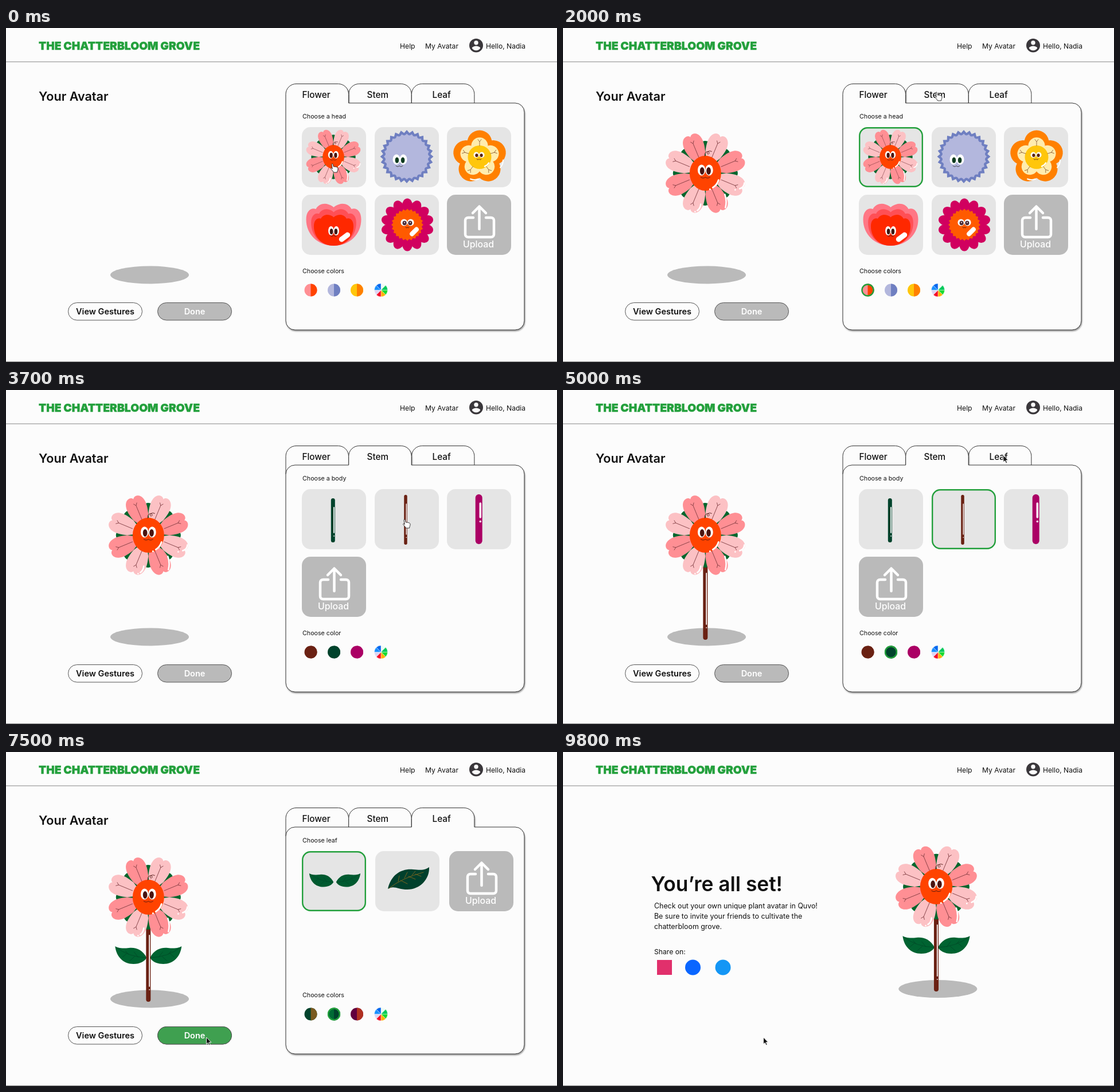
Recreate the animation shown at these times as an HTML page. Size 961 by 583 pixels, loop 9900 ms.

```html
<!DOCTYPE html>
<html lang="en">
<head>
<meta charset="utf-8">
<title>Plant avatar builder</title>
<style>
  html, body { margin: 0; width: 100%; height: 100%; overflow: hidden; background: #fcfcfc; }
  svg { display: block; }
  text { font-family: Inter, "Open Sans", sans-serif; fill: #111; }
  .line { fill: none; stroke-linecap: round; stroke-linejoin: round; }
  .panel { fill: #fcfcfc; stroke: #333; filter: drop-shadow(1.5px 2px 1px #0006); }
</style>
</head>
<body>
<svg id="stage" width="961" height="583" viewBox="0 0 961 583"></svg>
<script>
const GREEN = '#23a03c', GREY = '#bababa', BROWN = '#6a2113', FOREST = '#00432c', LEAF = '#006331';
const stage = document.getElementById('stage');

// Drawing helpers
const text = (x, y, size, weight, value, extra = '') =>
  `<text x="${x}" y="${y}" font-size="${size}" font-weight="${weight}" ${extra}>${value}</text>`;
const oval = (x, y, rx, ry, fill) => `<ellipse cx="${x}" cy="${y}" rx="${rx}" ry="${ry}" fill="${fill}"/>`;
const disc = (x, y, r, fill) => oval(x, y, r, r, fill);
const shape = (d, fill) => `<path d="${d}" fill="${fill}"/>`;
const line = (d, color, width) => `<path class="line" d="${d}" stroke="${color}" stroke-width="${width}"/>`;
const box = (x, y, w, h, r, fill, extra = '') =>
  `<rect x="${x}" y="${y}" width="${w}" height="${h}" rx="${r}" fill="${fill}" ${extra}/>`;
const at = (x, y, body, more = '') => `<g transform="translate(${x} ${y}) ${more}">${body}</g>`;
const spin = (n, item, offset = 0) => Array.from({ length: n }, (_, i) =>
  `<g transform="rotate(${offset + i * 360 / n})">${item(i)}</g>`).join('');
const fade = (name, body) => `<g style="opacity:var(--${name})">${body}</g>`;

const eyes = (x, y, gap, rx, ry, pupil, prx, pry) => [-1, 1].map(side =>
  oval(x + side * gap, y, rx, ry, '#fff') + oval(x + side * gap * .85, y + ry * .15, prx, pry, pupil)).join('');
const mouth = (x, y, w, color) =>
  line(`M${x - w} ${y - 1}q${w / 2} 3 ${w} 0q${w / 2} 3 ${w} 0`, color, .9);
const shine = (x, y, length, width, angle) =>
  at(x, y, box(-length / 2, -width / 2, length, width, width / 2, '#fff'), `rotate(${angle})`);

function star(points, outer, inner) {
  const corners = Array.from({ length: points * 2 }, (_, i) => {
    const a = i * Math.PI / points, r = i % 2 ? inner : outer;
    return `${(r * Math.sin(a)).toFixed(1)} ${(-r * Math.cos(a)).toFixed(1)}`;
  });
  return `M${corners.join('L')}Z`;
}

// Flower heads, each centred on 0,0
function daisy() {
  const petal = 'M0-10L-14-34C-17-44-19-53-17-61C-14-73-3-74 0-68C3-74 14-73 17-61C19-53 17-44 14-34Z';
  return spin(8, () => oval(0, -40, 13, 16.5, '#00662d')) +
    spin(8, i => shape(petal, i % 2 ? '#ff8f94' : '#fcc1c4') +
      line('M0-30V-56M-3-60L0-56L3-60', '#7d3a3f', .8), 22.5) +
    oval(0, 0, 27.5, 30.5, '#ff4300') +
    line('M-1-30C-2-36 2-39 6-37C9-34 3-32 3-35C3-38 7-40 11-38', '#4a1410', .9) +
    eyes(0, -5.5, 6.7, 6.7, 9.5, '#4a1410', 3.8, 6.5) + mouth(0, 8, 8, '#4a1410') +
    line('M23 12Q20 21 13 25M8 28h.1', '#fff', 3) +
    line('M68 17Q68 24 60 27M52 29h.1M34 37Q38 48 35 60M-8 54Q-9 62-14 65M-18 67h.1', '#fff', 2.6);
}
const puff = () =>
  shape(star(28, 46.5, 41.5), '#6f7fc1') + shape(star(28, 40, 36.5), '#b3b7dd') + disc(0, 0, 37.5, '#b3b7dd') +
  eyes(-12, 5, 6, 6.5, 9, '#0d3b20', 3.3, 5) + mouth(-13, 17, 6, '#333');
const blossom = () =>
  spin(5, () => disc(0, -25.5, 21.5, '#ff8000')) + spin(5, () => disc(0, -20, 14.5, '#ffecae')) +
  disc(0, 0, 20.5, '#ffc60b') + spin(5, () => line('M0-20V-27M-3-31L0-27L3-31', '#8a5a30', .8)) +
  eyes(-1, -4, 4.8, 4.7, 5, '#5b2410', 2.6, 3) + mouth(-1, 4, 4, '#5b2410') +
  line('M-16 38Q-9 41-2 38M41 5Q41 13 36 18', '#fff', 2) + line('M9 16Q14 14 16 10', '#fff', 2.5);
function tulip() {
  const half = shape('M0 0C-28 0-48-20-48-46C-48-60-40-67-31-64C-27-72-17-75-9-72C-5-71-2-69 0-67L1-67V0Z', 'currentColor');
  const layer = (sx, sy, color) => `<g color="${color}">` +
    [-1, 1].map(side => at(0, 37, half, `scale(${side * sx} ${sy})`)).join('') + '</g>';
  return layer(1, 1, '#ff7785') + layer(.82, .87, '#ff4f55') + layer(.72, .74, '#ff2800') +
    eyes(0, 11, 4.6, 4.8, 8, '#3d1712', 2.8, 5) + mouth(0, 20, 6, '#3d1712') + shine(19, 22, 22, 9, -37);
}
const dahlia = () =>
  spin(14, () => oval(0, -34, 9, 12, '#d1005f')) + disc(0, 0, 34, '#d1005f') +
  shape(star(24, 28, 25), '#ff5a00') +
  eyes(0, -4, 5.8, 5.8, 6, '#4b2a35', 3.5, 3.8) + disc(-5, -4, 1, '#fff') + disc(5, -4, 1, '#fff') +
  mouth(0, 5, 3, '#4b1a10') + shine(12, 12, 19, 8, -45);

// Stems and leaves
const stem = (x, y, w, h, color, shineX, top, bottom, shineW) =>
  box(x - w / 2, y, w, h, w / 2, color) +
  line(`M${shineX} ${top}V${bottom}M${shineX} ${bottom + 4 + shineW}h.1`, '#fff', shineW);
function leafPair(color) {
  const leaf = shape('M3 106C10 92 22 87.5 34 89S54 89 58 86C56 104 44 117 26 117C14 117 6 112 3 106Z', color) +
    line('M4 106Q34 105 56 88M18 105L25 96M24 104L33 112M35 100L40 94M38 99L45 105', '#004526', .7);
  return leaf + `<g transform="scale(-1 1)">${leaf}</g>`;
}
const bigLeaf = () =>
  shape('M666 239C672 212 692 203 710 205S732 205 738 201C739 222 722 240 700 240C684 240 676 232 666 239Z', '#00402c') +
  line('M668 238Q690 220 728 210M684 226L686 216M695 220L700 210M708 215L714 208M688 224L700 230M702 217L714 222M714 213L724 217', '#7a6420', 1);

// Interface parts
const tile = (x, y, body = '') => box(x, y, 112, 105, 15, '#e5e5e5') + body;
const pickedTile = (x, y) => box(x + 1.2, y + 1.2, 109.6, 102.6, 14, 'none', `stroke="${GREEN}" stroke-width="2.4"`);
const upload = (x, y) => at(x, y, box(0, 0, 112, 105, 15, GREY) +
  line('M46 40H37a5 5 0 0 0-5 5V69a5 5 0 0 0 5 5H77a5 5 0 0 0 5-5V45a5 5 0 0 0-5-5H68M56.5 60V21M45 32L56.5 20.5L68 32', '#fff', 4.5) +
  text(55, 92, 15.9, 500, 'Upload', 'text-anchor="middle" style="fill:#fff"'));
const pickedSwatch = x => `<circle cx="${x}" cy="457.5" r="10" fill="none" stroke="${GREEN}" stroke-width="2.4"/>`;

function swatches(pairs) {
  const xs = [531.5, 572, 612];
  const wheel = ['#eefaf4', '#00c95a', '#18dc30', '#ffb000', '#f5102a', '#dfd5f2', '#1890ff', '#0868ee'];
  return pairs.map(([left, right], i) =>
    at(xs[i], 457.5, disc(0, 0, 11, left) + shape('M0-11a11 11 0 0 1 0 22z', right || left))).join('') +
    at(654, 457.5, spin(8, i => `<path d="M0 0V-11.5A11.5 11.5 0 0 1 8.13-8.13Z" fill="${wheel[i]}" stroke="#fff" stroke-width=".4"/>`));
}

function panel(active, heading, colors, body) {
  const tabTop = 'V115.5a18 18 0 0 1 18-18h73.5a18 18 0 0 1 18 18';
  const left = i => 488 + i * 109.7;
  const tabs = [0, 1, 2].filter(i => i !== active)
    .map(i => `<path d="M${left(i)} 147${tabTop}V147" fill="#fcfcfc" stroke="#333"/>`).join('');
  const corner = active ? `a16 16 0 0 1 16-16H${left(active)}` : '';
  return `<g id="panel${active}">${tabs}
    <path class="panel" d="M488 147${corner}${tabTop}V131H888a16 16 0 0 1 16 16V511a16 16 0 0 1-16 16H504a16 16 0 0 1-16-16Z"/>
    ${['Flower', 'Stem', 'Leaf'].map((name, i) => text([516.5, 629.5, 743.5][i], 122, 15.3, 500, name)).join('')}
    ${text(517, 158, 10.7, 400, heading)}
    ${text(517, 427.5, 10.7, 400, active === 1 ? 'Choose color' : 'Choose colors')}
    ${swatches(colors)}${body}</g>`;
}

const button = (x, fill, label, color) => box(x, 479.5, 129, 30.5, 15.2, fill, 'stroke="#555"') +
  text(x + 64.5, 500, 14.5, 600, label, `text-anchor="middle" style="fill:${color}"`);

const bloom = (x, y, scale) => at(x, y, '<use href="#daisy"/>', `scale(${scale})`);
const plantStem = stem(0, 45, 8, 138, BROWN, 1.8, 67, 156, 1.8);

const header =
  text(57, 38, 19.3, 900, 'THE CHATTERBLOOM GROVE', `style="fill:${GREEN}" stroke="${GREEN}" stroke-width=".4"`) +
  text(687, 36, 12.2, 400, 'Help') + text(731, 36, 12.2, 400, 'My Avatar') + text(837, 36, 12.1, 400, 'Hello, Nadia') +
  at(820, 30.5, disc(0, 0, 12, '#3a373b') + disc(0, -4.8, 3.7, '#fcfcfc') +
    shape('M-7.2 4.8C-7.2 2.4-2.4 1.1 0 1.1S7.2 2.4 7.2 4.8C4 10-4 10-7.2 4.8Z', '#fcfcfc')) +
  line('M0 59H961M0 582.5H961', '#858585', 1);

const builder =
  text(57, 127, 21.6, 600, 'Your Avatar') + oval(250.5, 431, 68.5, 15.5, GREY) +
  at(248.3, 253, fade('leaf', leafPair(LEAF)) + fade('stem', plantStem)) +
  fade('flower', bloom(248.3, 253.5, 1)) +
  button(108.5, '#fcfcfc', 'View Gestures', '#111') + button(264.5, GREY, 'Done', '#fff') +
  fade('leaf', button(264.5, '#3fa050', 'Done', '#fff')) +
  panel(0, 'Choose a head', [['#ff8f94', '#ff4300'], ['#b3b7dd', '#6f7fc1'], ['#ffc60b', '#ff8000']],
    tile(516, 173, bloom(571, 225, .685)) + tile(643, 173, at(699, 224.5, puff())) +
    tile(769, 173, at(826, 225.5, blossom())) + tile(516, 291, at(571.5, 343, tulip())) +
    tile(643, 291, at(700, 343.5, dahlia())) + upload(769, 291) +
    fade('flower', pickedTile(516, 173) + pickedSwatch(531.5))) +
  panel(1, 'Choose a body', [[BROWN], [FOREST], ['#ab0065']],
    tile(516, 173, stem(570.3, 189, 7, 77, FOREST, 572, 205, 249, 1.8)) +
    tile(643, 173, stem(697, 183, 5.5, 87, BROWN, 698.2, 199, 252, 1.4)) +
    tile(769, 173, stem(824.7, 182, 12, 87, '#ab0065', 827.3, 198, 222, 3.5)) + upload(516, 291) +
    fade('stem', pickedTile(643, 173) + pickedSwatch(572))) +
  panel(2, 'Choose leaf', [[FOREST, '#7a5a20'], ['#006a35', FOREST], ['#62003f', '#b03020']],
    tile(516, 173, at(573.5, 145.5, leafPair('#005a30'), 'scale(.77)')) +
    tile(644, 173, bigLeaf()) + upload(773, 173) +
    fade('leaf', pickedTile(516, 173) + pickedSwatch(572)));

const finish =
  box(0, 60, 961, 522, 0, '#fcfcfc') + text(153.5, 243, 35.3, 600, 'You’re all set!') +
  ['Check out your own unique plant avatar in Quvo!', 'Be sure to invite your friends to cultivate the', 'chatterbloom grove.']
    .map((row, i) => text(159, 272.5 + i * 18.4, 12.4, 400, row)).join('') +
  text(159, 353, 12.2, 400, 'Share on:') +
  box(164, 363, 26, 26, 0, '#e1306c') + disc(226.5, 376, 13.5, '#0a66ff') + disc(279, 376, 13.5, '#1496f5') +
  oval(653.8, 413.5, 68.5, 15.5, GREY) +
  at(651, 235, leafPair(LEAF) + plantStem + bloom(0, 0, 1.015), 'scale(1.01 1)');

const hand = 'M0 1.2C0-.5 2-.5 2.3 1.2L3.2 5C8 5 11 6 11 8.5C11 11 10 12 9.5 15H3.5C2 12-1 9.5-1.5 8.5C-1.5 7 0 7 1.2 8.8Z';
const arrow = 'M0 0V12L2.8 9.4L4.7 13.8L6.7 13L4.8 8.7H8.5Z';

stage.innerHTML = `<defs><g id="daisy">${daisy()}</g></defs>${header}${builder}${fade('finish', finish)}
  <path id="cursor" stroke-width=".9"/>`;

// Timeline, in milliseconds
const LOOP = 9900, STEP = 100;
const fades = { flower: [400, 700], stem: [3800, 4100], leaf: [6300, 6700], finish: [7600, 7900] };
const tabStarts = [0, 2200, 5100, LOOP];
const stops = [
  [0, 568, 237], [1100, 568, 237], [1900, 650, 112], [2500, 650, 112], [3400, 694, 226], [4200, 694, 226],
  [4900, 768, 114], [5200, 768, 114], [6100, 598, 225], [6700, 598, 225], [7400, 349.5, 498], [LOOP, 349.5, 498]
];
const cursor = document.getElementById('cursor');
const panels = [0, 1, 2].map(i => document.getElementById('panel' + i));
const progress = (t, from, to) => Math.min(1, Math.max(0, (t - from) / (to - from)));

function render(now) {
  const t = Math.floor(now % LOOP / STEP) * STEP;
  for (const [name, [from, to]] of Object.entries(fades)) stage.style.setProperty('--' + name, progress(t, from, to));
  panels.forEach((p, i) => p.style.display = t >= tabStarts[i] && t < tabStarts[i + 1] ? '' : 'none');

  const next = stops.findIndex(stop => stop[0] > t);
  const [t0, x0, y0] = stops[next - 1], [t1, x1, y1] = stops[next];
  const p = progress(t, t0, t1), ease = p * p * (3 - 2 * p);
  const pointing = t <= 4200;
  cursor.setAttribute('d', pointing ? hand : arrow);
  cursor.setAttribute('fill', pointing ? '#fff' : '#111');
  cursor.setAttribute('stroke', pointing ? '#222' : '#fff');
  cursor.setAttribute('transform', `translate(${x0 + (x1 - x0) * ease} ${y0 + (y1 - y0) * ease})`);
}

const start = performance.now();
function tick() {
  render(performance.now() - start);
  requestAnimationFrame(tick);
}
tick();
</script>
</body>
</html>
```
